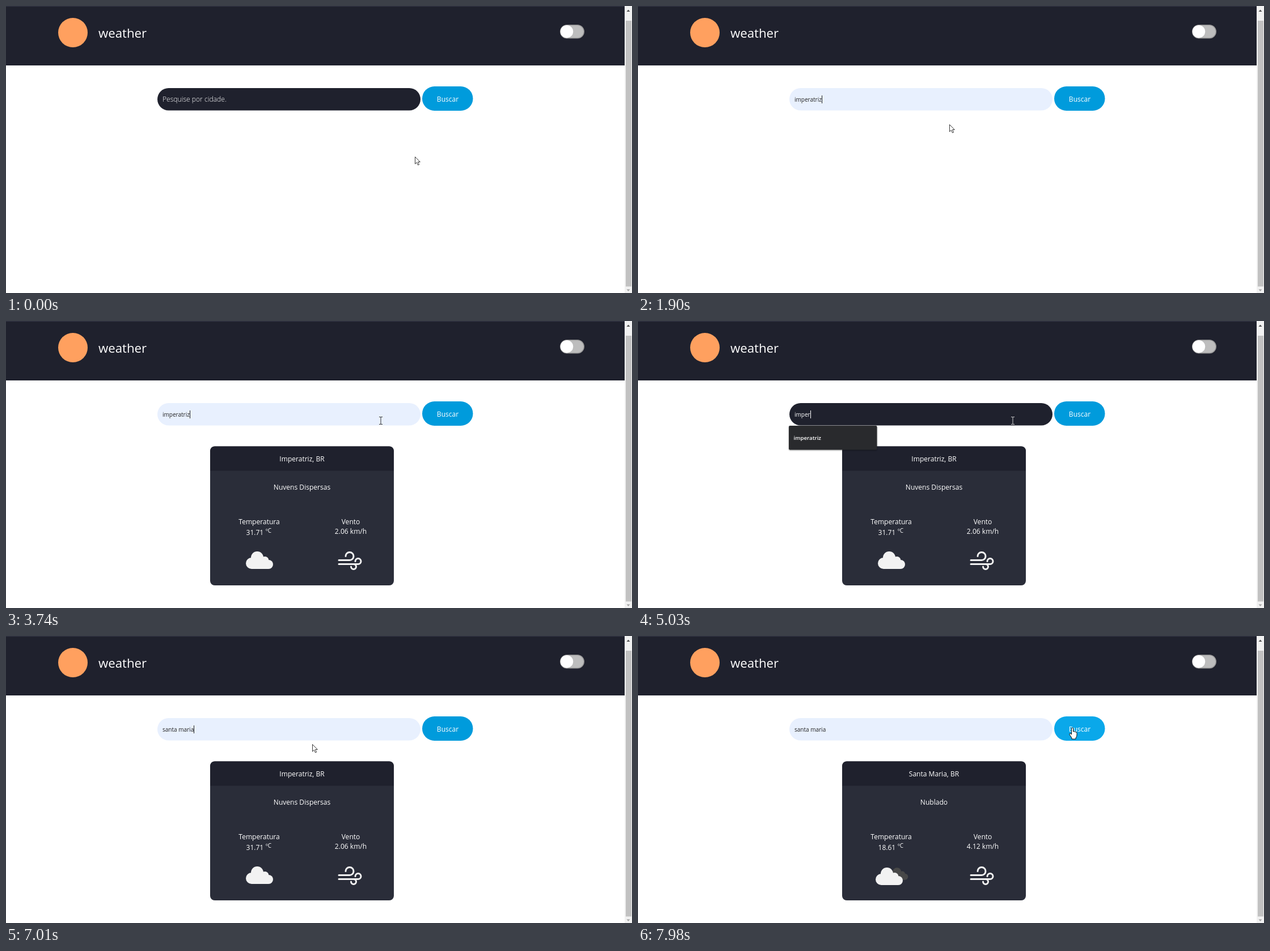
These frames come from a looping animation (1104 by 507 pixels, 8000 ms). An HTML page:

```html
<!DOCTYPE html>
<html lang="pt-BR">
<head>
<meta charset="utf-8">
<title>weather</title>
<style>
  html, body { margin: 0; width: 100%; height: 100%; overflow: hidden; background: #fff; }
  svg { display: block; width: 100vw; height: 100vh; }
  text { font: 12.05px "Open Sans", "Noto Sans", sans-serif; fill: #fff; white-space: pre; }
  .mid { text-anchor: middle; }
  .brand { font-size: 22.2px; }
  .hint { font-size: 12.1px; font-weight: 300; }
  .typed { font-size: 10px; }
  .sup { font-size: 10px; }
  .row { font-size: 9.7px; font-weight: 600; }
  #menu { filter: drop-shadow(0 1px 1px rgba(0, 0, 0, .4)); }
</style>
</head>
<body>
<svg viewBox="0 0 1104 507" preserveAspectRatio="none">
  <defs>
    <g id="cloud">
      <circle cx="433" cy="428" r="10"/>
      <circle cx="443" cy="418" r="11"/>
      <circle cx="456.5" cy="423" r="7"/>
      <circle cx="463" cy="430" r="8"/>
      <path d="M433 438V420H450L463 424V438Z"/>
    </g>
  </defs>

  <rect width="1091" height="105" fill="#1f212d"/>
  <rect width="1091" height="1" fill="#333645"/>
  <circle cx="118" cy="47" r="26" fill="#ffa05f"/>
  <text class="brand" x="163" y="56">weather</text>
  <rect x="977.75" y="33.75" width="41.5" height="23" rx="11.5" fill="#bdbdbd" stroke="#999" stroke-width="1.5"/>
  <circle cx="989" cy="45.2" r="11.2" fill="#fff"/>

  <rect x="1091" width="13" height="507" fill="#f1f1f1"/>
  <rect x="1093" y="26" width="10" height="469.5" fill="#c1c1c1"/>
  <path d="M1094.5 10L1097.5 6.5L1100.5 10Z" fill="#505050"/>
  <path d="M1094.5 500.5L1097.5 504L1100.5 500.5Z" fill="#a3a3a3"/>

  <rect id="field" x="267" y="145" width="464" height="39.5" rx="19.75"/>
  <text id="hint" class="hint" x="276" y="169">Pesquise por cidade.</text>
  <text id="typed" class="typed" x="276" y="169"></text>
  <rect id="caret" y="158" width="1" height="14"/>
  <rect id="button" x="734" y="142" width="89.5" height="43" rx="21.5"/>
  <text class="mid" x="779" y="169">Buscar</text>

  <path id="spinner" d="M522 211A13 13 0 1 1 509 224" fill="none" stroke="#1f212d" stroke-width="3"/>

  <g id="card">
    <rect x="360" y="221.5" width="324" height="245.5" rx="8" fill="#2a2d39"/>
    <path d="M360 264.5V229.5A8 8 0 0 1 368 221.5H676A8 8 0 0 1 684 229.5V264.5Z" fill="#1f212d"/>
    <text id="city" class="mid" x="522" y="248"></text>
    <text id="sky" class="mid" x="522" y="298"></text>
    <text class="mid" x="446.5" y="359">Temperatura</text>
    <text id="temp" x="423.5" y="378"></text>
    <text class="sup" x="458" y="373.5">ºC</text>
    <text class="mid" x="608" y="359">Vento</text>
    <text id="wind" class="mid" x="608" y="376"></text>
    <g id="backCloud" fill="#484848"><use href="#cloud" transform="translate(148 125.5) scale(.697)"/></g>
    <use id="frontCloud" href="#cloud" fill="#f2f2f2"/>
    <path d="M587 422.5H606A7 7 0 1 0 599 415.5M587 429.5H621A5 5 0 1 0 616 424.5M600 429.5H613A4.5 4.5 0 1 1 608.5 434"
      fill="none" stroke="#f2f2f2" stroke-width="3" stroke-linecap="round"/>
  </g>

  <g id="menu">
    <rect id="menuBox" x="266" y="185" width="155.5" rx="2" fill="#292a2d"/>
    <rect id="menuHover" x="266" width="155.5" height="29.1" fill="#3f4042"/>
    <g id="rows"></g>
  </g>

  <g id="cursor">
    <path id="arrow" d="M.5 .5V13L3.4 10.3L5.5 15L7.6 14.1L5.5 9.5H9.3Z" fill="#fff" stroke="#222" stroke-width=".9"/>
    <path id="beam" d="M-3 -6.5H-1Q0 -6.5 0 -5.5Q0 -6.5 1 -6.5H3M0 -5.5V5.5M-3 6.5H-1Q0 6.5 0 5.5Q0 6.5 1 6.5H3" fill="none"/>
    <path id="hand" d="M-1.5 1Q0 -1.3 1.5 1V7Q3 5.5 4 7.3Q5.5 6.2 6.2 8Q8 7.3 8 9.5V13Q8 16 6 18V20H-1V18L-4.8 12.5Q-5.5 10 -3.5 10L-1.5 12Z"
      fill="#fff" stroke="#111" stroke-width="1"/>
  </g>
</svg>
<script>
const LOOP = 8000, TICK = 68.4, FIRST = 310;
const ROW = 29.1, MENU_TOP = 185, PAD = 6.7;
const RECENT = ["imperatriz", "rio de janeiro", "sssfsf", "fghffhfhfh", "ssssssss", "wwww"];
const WITH_S = ["sssfsf", "ssssssss", "sssss", "santa maria"];

// Pointer path: tick, x, y
const PATH = [
  [0, 721, 266], [7, 525, 168], [10, 525, 168], [15, 398, 205], [18, 390, 208], [21, 390, 208],
  [24, 549, 209], [31, 768, 167], [32, 766, 165], [33, 766, 165], [36, 759, 222], [38, 759, 222],
  [46, 665, 178], [49, 665, 178], [51, 661, 176], [85, 661, 176], [88, 590, 138], [92, 385, 208],
  [97, 390, 206], [99, 540, 191], [105, 745, 172], [108, 766, 162]
];

const el = {};
document.querySelectorAll("[id]").forEach(node => el[node.id] = node);
const set = (node, attrs) => { for (const k in attrs) node.setAttribute(k, attrs[k]); };
const show = (node, on) => node.style.display = on ? "" : "none";
const write = (node, text) => { if (node.textContent !== text) node.textContent = text; };
const within = (v, from, to) => v >= from && v < to;

const rows = RECENT.map((_, i) => {
  const row = document.createElementNS("http://www.w3.org/2000/svg", "text");
  set(row, { class: "row", x: 274.5, y: MENU_TOP + 25 + i * ROW });
  return el.rows.appendChild(row);
});

function pointer(n) {
  const i = PATH.findIndex(p => p[0] > n);
  if (i < 0) return PATH[PATH.length - 1].slice(1);
  const a = PATH[i - 1], b = PATH[i], k = (n - a[0]) / (b[0] - a[0]);
  return [1, 2].map(j => a[j] + (b[j] - a[j]) * k);
}

function inputText(n) {
  if (n < 21) return "";
  if (n < 58) return "imperatriz";
  if (n < 75) return "imperatri".slice(0, 9 - Math.max(0, Math.round((n - 67) * 9 / 7)));
  if (n < 80) return "s";
  return n < 96 ? "sa" : "santa maria";
}

function menuItems(n) {
  if (within(n, 10, 22)) return RECENT;
  if (within(n, 58, 74)) return ["imperatriz"];
  if (within(n, 75, 80)) return WITH_S;
  return within(n, 80, 97) ? ["santa maria"] : [];
}

function menuOpacity(n) {
  if (n === 10 || n === 21) return .5;
  if (n === 58) return .35;
  return n === 59 ? .7 : 1;
}

function drawMenu(items, hovered, opacity) {
  show(el.menu, items.length);
  set(el.menu, { opacity });
  set(el.menuBox, { height: 2 * PAD + items.length * ROW });
  show(el.menuHover, hovered >= 0);
  set(el.menuHover, { y: MENU_TOP + PAD + Math.max(0, hovered) * ROW });
  rows.forEach((row, i) => write(row, items[i] || ""));
}

function drawInput(n, preview) {
  const text = inputText(n), shown = preview || text;
  const filled = preview || within(n, 21, 58) || n >= 96;
  const ink = filled ? "#222" : "#fff";
  set(el.field, { fill: filled ? "#e8f0fe" : "#1f212d" });
  show(el.hint, !shown);
  write(el.typed, shown);
  el.typed.style.fill = ink;
  const caretOn = within(n, 10, 29) || within(n, 51, 65) || within(n, 68, 86) || within(n, 92, 106);
  show(el.caret, caretOn);
  const end = text ? el.typed.getSubStringLength(0, Math.min(text.length, shown.length)) : 0;
  set(el.caret, { x: Math.round(276 + end), fill: ink });
}

function drawCard(n) {
  const second = n >= 113;
  show(el.card, within(n, 39, 109) || second);
  show(el.spinner, within(n, 36, 39) || within(n, 109, 113));
  write(el.city, second ? "Santa Maria, BR" : "Imperatriz, BR");
  write(el.sky, second ? "Nublado" : "Nuvens Dispersas");
  write(el.temp, second ? "18.61" : "31.71");
  write(el.wind, second ? "4.12 km/h" : "2.06 km/h");
  show(el.backCloud, second);
  set(el.frontCloud, second
    ? { transform: "translate(-4 2)", stroke: "#2a2d39", "stroke-width": 0 }
    : { transform: "translate(0 0)" });
}

function drawPointer(x, y, overField, overButton, light) {
  set(el.cursor, { transform: `translate(${x} ${y})` });
  show(el.hand, overButton);
  show(el.beam, overField);
  show(el.arrow, !overField && !overButton);
  set(el.beam, { stroke: light ? "#333" : "#ccc" });
}

function draw(t) {
  const n = t < FIRST ? 0 : Math.floor((t - FIRST) / TICK + .1) + 1;
  const [x, y] = pointer(n);
  const overButton = within(x, 734, 824) && within(y, 142, 185);
  const overField = within(x, 267, 731) && within(y, 145, 185);
  const items = menuItems(n);
  const at = Math.floor((y - MENU_TOP - PAD) / ROW);
  const hovered = within(x, 266, 421.5) && within(at, 0, items.length) ? at : -1;
  drawMenu(items, hovered, menuOpacity(n));
  drawInput(n, hovered >= 0 ? items[hovered] : "");
  drawCard(n);
  set(el.button, { fill: overButton ? "#0aa8ea" : "#009bdc" });
  drawPointer(x, y, overField, overButton, el.field.getAttribute("fill") === "#e8f0fe");
}

const start = performance.now();
function loop() {
  draw((performance.now() - start) % LOOP);
  requestAnimationFrame(loop);
}
loop();
</script>
</body>
</html>
```
